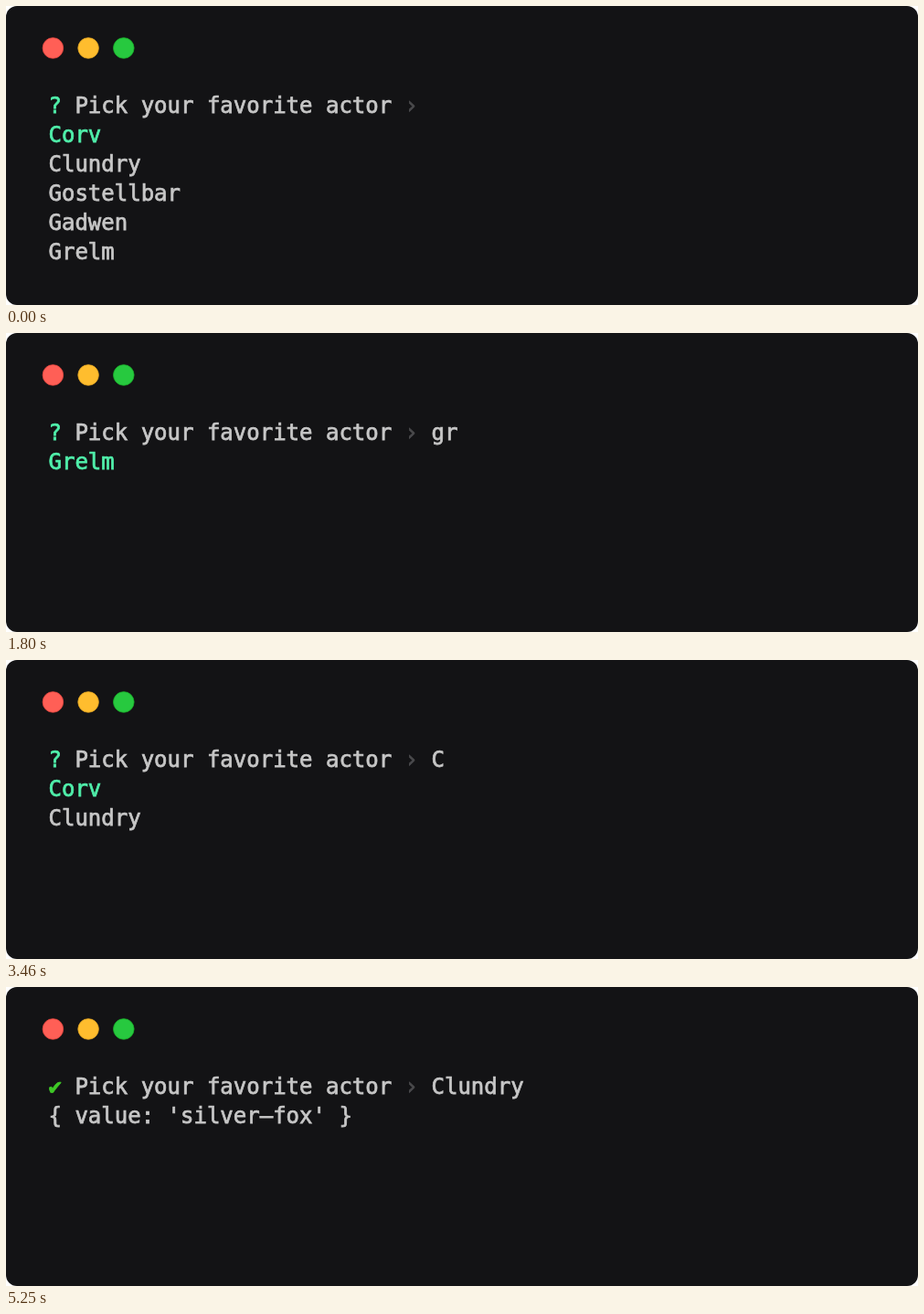
An HTML page for the animation above (5300 ms loop, 998 by 327 pixels).

```html
<!DOCTYPE html>
<html lang="en">
<head>
<meta charset="utf-8">
<title>Autocomplete prompt</title>
<style>
  html, body { margin: 0; width: 100%; height: 100%; overflow: hidden; background: #fff; }
  svg { display: block; width: 998px; height: 327px; }
  text {
    font: 24px "DejaVu Sans Mono", "DejaVu Sans", monospace;
    white-space: pre;
    fill: #c7c7c7;
    stroke: #c7c7c7;
    stroke-width: .75px;
  }
  .accent { fill: #50f0ab; stroke: #50f0ab; }
  .done { fill: #3fc927; stroke: #3fc927; }
  .dim { fill: #4b4b4d; stroke: #4b4b4d; }
</style>
</head>
<body>
<svg viewBox="0 0 998 327">
  <rect width="998" height="327" rx="12" fill="#131315"/>
  <circle cx="51.4" cy="46" r="11.3" fill="#ff5f56" stroke="#e0443e" stroke-width=".8"/>
  <circle cx="90.1" cy="46" r="11.3" fill="#ffbd2e" stroke="#dea123" stroke-width=".8"/>
  <circle cx="128.8" cy="46" r="11.3" fill="#27c93f" stroke="#1aab29" stroke-width=".8"/>
  <g id="screen"></g>
</svg>
<script>
const LOOP = 5300;
const LEFT = 46.5, BASE = 117, CELL = 14.448, ROW = 32;
const QUESTION = 'Pick your favorite actor';
const NAMES = ['Corv', 'Clundry', 'Gostellbar', 'Gadwen', 'Grelm'];

// Each step: start time in ms, typed text, submitted or not
const STEPS = [
  [0, ''],
  [500, 'g'],
  [1060, 'gr'],
  [1900, 'g'],
  [2600, ''],
  [3450, 'C'],
  [3800, 'Cl'],
  [4700, 'Clundry', true]
];

const screen = document.getElementById('screen');

function put(col, row, str, kind = '') {
  const el = document.createElementNS('http://www.w3.org/2000/svg', 'text');
  el.setAttribute('x', LEFT + col * CELL);
  el.setAttribute('y', BASE + row * ROW);
  el.setAttribute('class', kind);
  el.textContent = str;
  screen.append(el);
}

function draw([, typed, submitted]) {
  screen.replaceChildren();
  put(0, 0, submitted ? '✔' : '?', submitted ? 'done' : 'accent');
  put(2, 0, QUESTION);
  put(27, 0, '›', 'dim');
  put(29, 0, typed);
  if (submitted) {
    put(0, 1, "{ value: 'silver–fox' }");
    return;
  }
  NAMES.filter(name => name.toLowerCase().startsWith(typed.toLowerCase()))
    .forEach((name, i) => put(0, i + 1, name, i ? '' : 'accent'));
}

let shown;
function tick() {
  const t = performance.now() % LOOP;
  const step = STEPS.findLast(([start]) => start <= t);
  if (step !== shown) draw(shown = step);
  requestAnimationFrame(tick);
}
tick();
</script>
</body>
</html>
```
